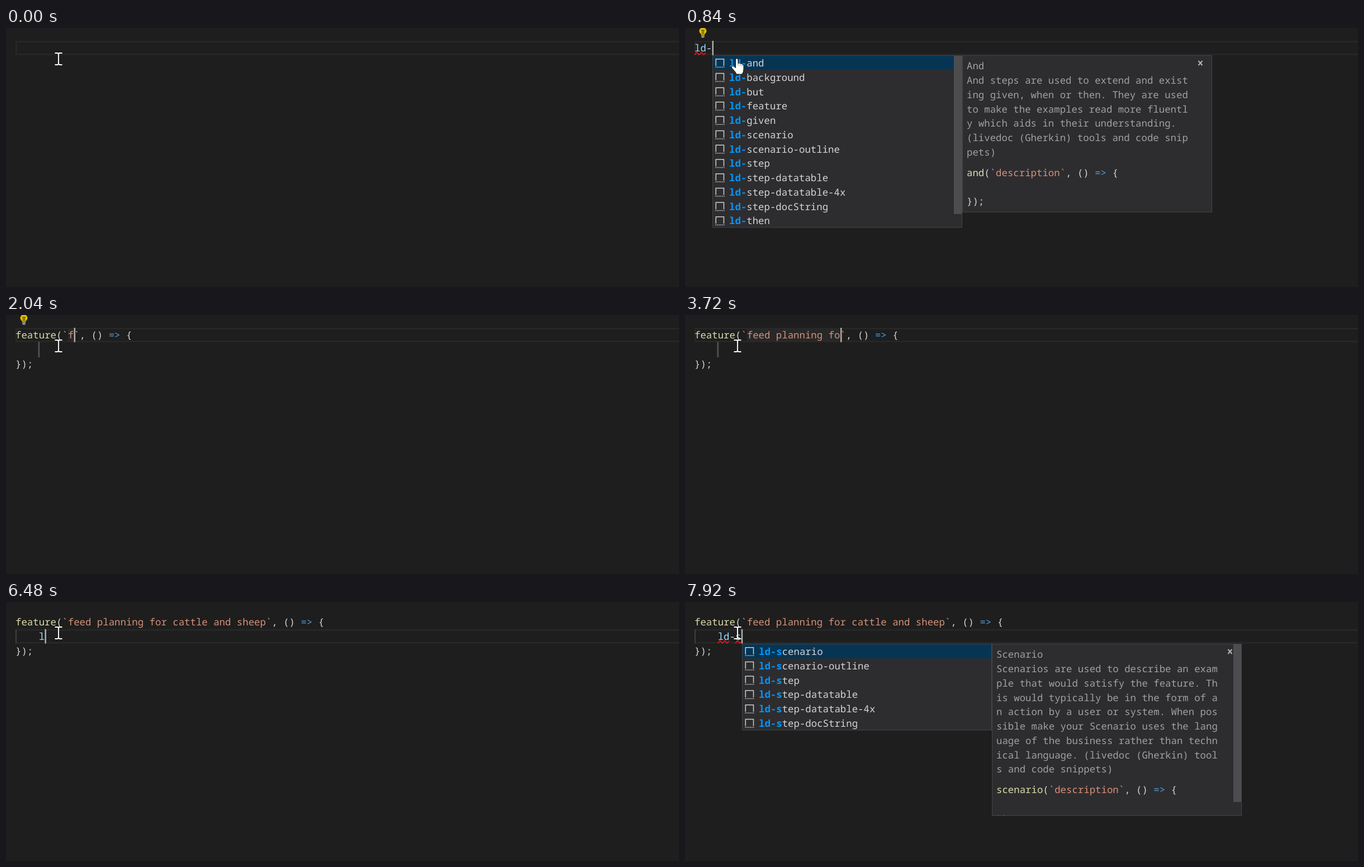
Animation, 1204 px wide and 465 px high, one loop 8 s. Source, as an HTML page:

```html
<!DOCTYPE html>
<html lang="en">
<head>
<meta charset="utf-8">
<title>Snippet typing</title>
<style>
  html, body { margin: 0; width: 100%; height: 100%; overflow: hidden; background: #1e1e1e; }
  #stage { display: block; }
  text {
    font: 17.38px "Noto Sans Mono", "DejaVu Sans Mono", monospace;
    white-space: pre; text-rendering: geometricPrecision; fill: #d4d4d4;
  }
  .fn { fill: #dcdcaa; }
  .str { fill: #d69178; }
  .op { fill: #569cd6; }
  .id { fill: #9cdcfe; }
  .doc { fill: #a0a0a0; }
  .hit { fill: #0097fb; font-weight: 700; }
  .panel { fill: #2d2d30; stroke: #454545; }
  .thumb { fill: #4d4d4f; }
</style>
</head>
<body>
<svg id="stage" width="1204" height="465" viewBox="0 0 1204 465"></svg>
<script>
const LOOP = 8000, CHAR = 10.428, LINE = 25.75, LEFT = 17, TOP = 23;
const PANEL_W = 447;
// Popup edge for each caret column.
const POPUP_X = [17, 28, 38, 49, 59, 69, 80, 91, 102];
const TITLE = 'feed planning for cattle and sheep';

const lists = {
  all: ['and', 'background', 'but', 'feature', 'given', 'scenario', 'scenario-outline',
    'step', 'step-datatable', 'step-datatable-4x', 'step-docString', 'then'],
  feature: ['feature'],
  scenario: ['scenario', 'scenario-outline', 'step', 'step-datatable', 'step-datatable-4x', 'step-docString']
};

const docs = {
  all: { fn: 'and', height: 281, lines: ['And',
    'And steps are used to extend and exist',
    'ing given, when or then. They are used',
    'to make the examples read more fluentl',
    'y which aids in their understanding.',
    '(livedoc (Gherkin) tools and code snip',
    'pets)'] },
  feature: { fn: 'feature', height: 281, lines: ['Feature',
    'Features are used to describe a high l',
    'evel piece of functionality that the s',
    'ystem provides. It groups the related ',
    'Scenarios and gives them a shared cont',
    'ext. (livedoc (Gherkin) tools and code',
    'snippets)'] },
  scenario: { fn: 'scenario', height: 308, thumb: 283, lines: ['Scenario',
    'Scenarios are used to describe an exam',
    'ple that would satisfy the feature. Th',
    'is would typically be in the form of a',
    'n action by a user or system. When pos',
    'sible make your Scenario uses the lang',
    'uage of the business rather than techn',
    'ical language. (livedoc (Gherkin) tool',
    's and code snippets)'] }
};

const typed = (time, count) => [time, { title: TITLE.slice(0, count), selected: false }];

// Each cue changes part of the state from its time on.
const cues = [
  [0, { row: 0, word: '', title: null, caret: false, bulb: false, marks: [], popup: null, thumb: 0,
        docs: true, selected: false, tabStop: false, guide: false }],
  [120, { caret: true }],
  [360, { word: 'l' }],
  [480, { word: 'ld', popup: 'all', thumb: 57 }],
  [720, { bulb: true, marks: [[0, 2]] }],
  [840, { word: 'ld-', thumb: 284 }],
  [960, { word: 'ld-f', popup: 'feature', thumb: 0 }],
  [1080, { word: 'ld-fe' }],
  [1200, { word: 'ld-fea' }],
  [1320, { word: 'ld-feat' }],
  [1440, { marks: [[0, 2], [3, 7]] }],
  [1560, { word: '', title: 'description', selected: true, tabStop: true, popup: null, marks: [] }],
  typed(2040, 1), typed(2160, 2), [2160, { bulb: false }],
  typed(2280, 3), typed(2400, 4), typed(2520, 5), typed(2760, 6),
  typed(3000, 7), typed(3120, 9), typed(3240, 10),
  typed(3480, 13), typed(3600, 14), typed(3720, 16), typed(3840, 17), typed(3960, 19),
  typed(4080, 20), typed(4200, 22), typed(4320, 24), typed(4440, 25), typed(4560, 27),
  typed(4680, 28), typed(4800, 30), typed(4920, 31), typed(5040, 33), typed(5160, 34),
  [5520, { row: 1, tabStop: false }],
  [6120, { caret: false }],
  [6480, { word: 'l', caret: true, guide: true }],
  [6600, { popup: 'all', thumb: 57, docs: false }],
  [6720, { docs: true }],
  [7080, { caret: false }],
  [7320, { word: 'ld', caret: true, bulb: true, marks: [[0, 1]] }],
  [7560, { word: 'ld-', thumb: 284, bulb: false, marks: [[0, 2]] }],
  [7800, { word: 'ld-s', popup: 'scenario', thumb: 0 }],
  [7920, { marks: [[0, 2], [3, 4]] }]
];

const colX = col => LEFT + col * CHAR;
const text = (x, y, body, cls = '') => `<text x="${x}" y="${y}" class="${cls}">${body}</text>`;
const span = (cls, body) => `<tspan class="${cls}">${body}</tspan>`;
const rect = (x, y, w, h, attrs) => `<rect x="${x}" y="${y}" width="${w}" height="${h}" ${attrs}/>`;
const path = (d, attrs) => `<path d="${d}" ${attrs}/>`;
const call = (fn, title) =>
  span('fn', fn) + '(' + span('str', '`' + title + '`') + ', () ' + span('op', '=&gt;') + ' {';

function squiggle(x1, x2, y) {
  let d = `M${x1} ${y + 2}`;
  for (let x = x1 + 1; x <= x2; x++) d += `L${x} ${y + 2 * Math.cos((x - x1) * Math.PI / 4.1)}`;
  return path(d, 'fill="none" stroke="#f01818" stroke-width="1.7"');
}

function bulb(y) {
  return `<g transform="translate(32 ${y})">` +
    path('M-3 6.5C-3 4-6.5 3-6.5-.5A6.5 6.2 0 0 1 6.5-.5C6.5 3 3 4 3 6.5Z', 'fill="#e2bd00"') +
    path('M-3-2H3M-1.3-2V5M1.3-2V5', 'fill="none" stroke="#4a3e08" stroke-width="1.2"') +
    path('M-3 8.2H3M-2.5 10.6H2.5', 'stroke="#c5c5c5" stroke-width="1.5"') + '</g>';
}

function snippetIcon(x, y) {
  return path(`M${x + .8} ${y + 13}V${y + .8}H${x + 15}V${y + 13}`, 'fill="none" stroke="#cfcfcf" stroke-width="1.5"') +
    path(`M${x} ${y + 15.2}H${x + 16}`, 'stroke="#cfcfcf" stroke-width="1.5" stroke-dasharray="1.6 1.3"');
}

function listPanel(left, top, s) {
  const items = lists[s.popup], match = s.word.length, height = Math.round(items.length * LINE);
  let out = rect(left + .5, top + .5, PANEL_W - 1, height - .5, 'class="panel"') +
    rect(left + 1, top + 1, PANEL_W - 2, LINE - .5, 'fill="#063554"');
  items.forEach((item, i) => {
    const y = top + i * LINE, label = 'ld-' + item;
    out += snippetIcon(left + 5.5, y + 6) +
      text(left + 30, y + 20, span('hit', label.slice(0, match)) + label.slice(match));
  });
  if (s.thumb) out += rect(left + 432, top + 1, 14, s.thumb, 'class="thumb"');
  return out;
}

function docPanel(left, top, { fn, lines, height, thumb }) {
  const codeY = 25.3 + (lines.length - 1) * LINE + 36.8;
  let inner = lines.map((line, i) => text(8, 25.3 + i * LINE, line, 'doc')).join('') +
    text(8, codeY, call(fn, 'description')) + text(8, codeY + 2 * LINE, '});');
  if (thumb) inner += rect(432, 1, 14, thumb, 'class="thumb"');
  inner += path('M422.5 10l7 8m0-8l-7 8', 'stroke="#b4b4b4" stroke-width="2"');
  return rect(left + .5, top + .5, PANEL_W - 1, height, 'class="panel"') +
    `<svg x="${left}" y="${top}" width="${PANEL_W}" height="${height}" overflow="hidden">${inner}</svg>`;
}

function pointer(hand) {
  if (!hand) {
    return path('M87.5 45H92Q94 45.3 94 47.5Q94 45.3 96 45H100.5M94 47V64M87.5 66H92Q94 65.7 94 63.5Q94 65.7 96 66H100.5',
      'fill="none" stroke="#fff" stroke-width="1.9"');
  }
  return path('M90.5 57Q90.5 54.7 92.7 54.7Q95 54.7 95 57V63.5Q97 62 98.7 64Q101 63 102 65Q105 64.8 105 68V74' +
    'Q105 79 102 83H92Q91 79.5 87.5 76L83.5 71.5Q82.5 69 85 68.3Q87.5 68.2 90.5 71.5Z',
    'fill="#fff" stroke="#111" stroke-width="1"') +
    path('M95 63.5V68M98.7 64.5V68.5M102 65.5V69', 'stroke="#777" stroke-width=".8"');
}

function scene(s) {
  const lineY = TOP + s.row * LINE, base = row => 42 + row * LINE;
  const start = s.row ? 4 : 0, inTitle = s.title !== null && !s.row;
  const caretCol = inTitle ? 9 + s.title.length : start + s.word.length;
  let out = rect(18.3, lineY + 1.4, 1300, 23, 'fill="none" stroke="#282828" stroke-width="2.5"');

  if (inTitle) {
    out += rect(colX(9), TOP, colX(caretCol) - colX(9), LINE, `fill="${s.selected ? '#264f78' : '#282828'}"`);
  }
  if (s.tabStop) out += rect(57.5, 48, 2.7, 28, 'fill="#525252"');
  if (s.guide) out += rect(17, 49, 1.5, LINE, 'fill="#454545"');
  if (s.title !== null) out += text(LEFT, base(0), call('feature', s.title)) + text(LEFT, base(2), '});');

  const [head, tail] = s.word.split('-');
  out += text(colX(start), base(s.row), span('id', head) + (tail === undefined ? '' : '-' + span('id', tail)));
  for (const [from, to] of s.marks) out += squiggle(colX(start + from), colX(start + to), lineY + 23);
  if (s.caret) out += rect(colX(caretCol) + .3, lineY, 2.5, LINE, 'fill="#aeafad"');
  if (s.bulb) out += bulb(s.row ? 56.7 : 6);

  if (s.popup) {
    const left = POPUP_X[caretCol], top = s.row ? 75 : 49;
    out += listPanel(left, top, s);
    if (s.docs) out += docPanel(left + PANEL_W, top, docs[s.popup]);
  }
  return out + pointer(s.popup && !s.row);
}

const stage = document.getElementById('stage');
let shown = 0;

function frame() {
  const time = performance.now() % LOOP;
  const active = cues.filter(([at]) => at <= time);
  if (active.length !== shown) {
    shown = active.length;
    stage.innerHTML = scene(Object.assign({}, ...active.map(([, change]) => change)));
  }
  requestAnimationFrame(frame);
}
frame();
</script>
</body>
</html>
```
